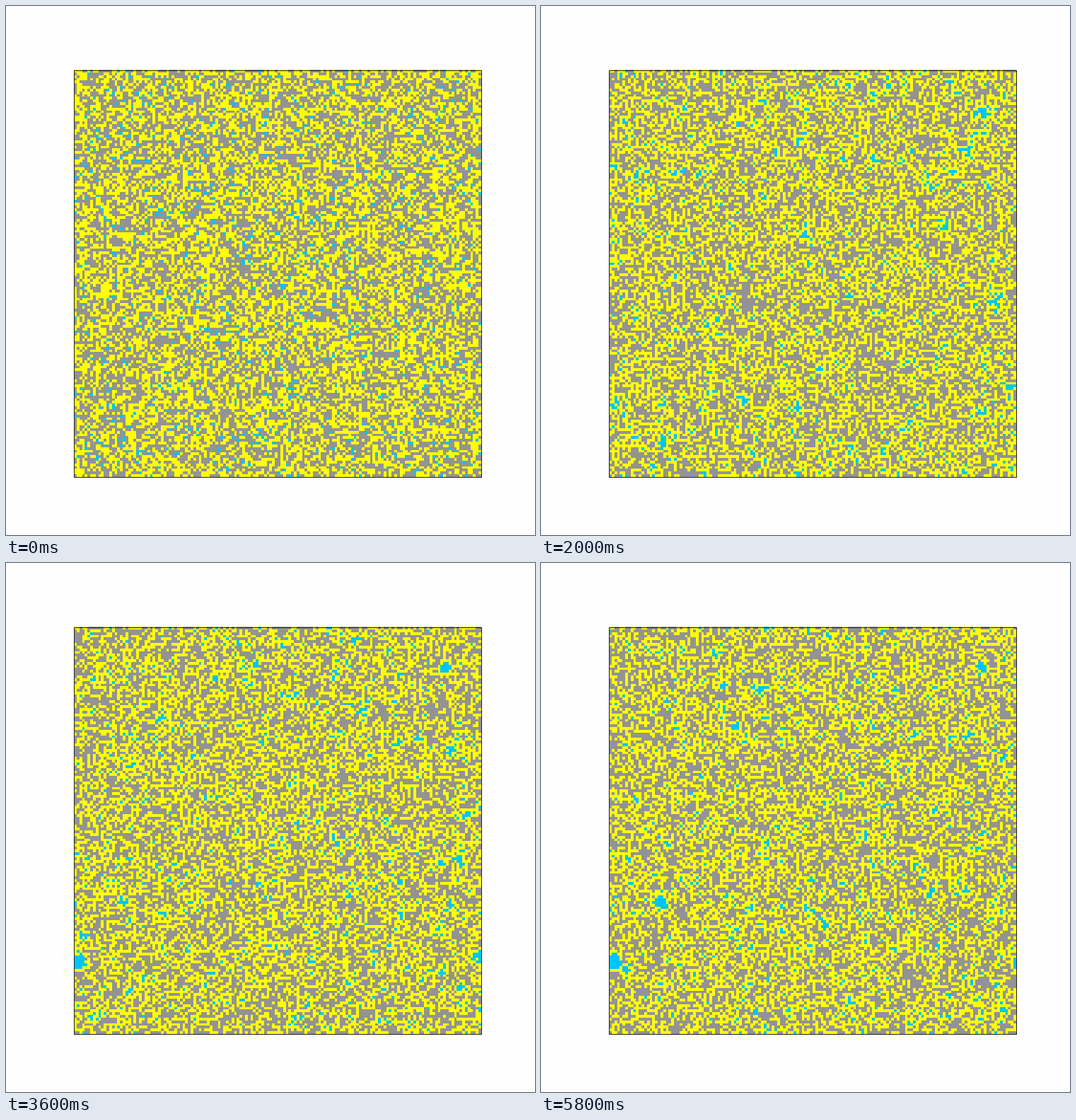
Recreate the animation shown at these times as a matplotlib script. Size 748 by 748 pixels, loop 6 s.

```python
from itertools import product

import matplotlib.pyplot as plt
import numpy as np
from matplotlib.animation import FuncAnimation
from matplotlib.colors import ListedColormap
from matplotlib.patches import Rectangle

SIZE = 748
N = 150
STEPS = 28
SWEEPS = 12
GRAY, YELLOW, CYAN = range(3)
COLORS = ["#939393", "#ffff00", "#00c4ff"]
SHARES = [0.495, 0.47, 0.035]

# Lasting droplets: centre x, y, final radius, first step
DROPS = [(137.4, 15, 1.9, 2), (2, 123, 2.9, 6),
         (18.6, 101.2, 2.1, 14), (118.8, 97.4, 1.5, 20)]


def pull(step):
    """Cells that attract cyan, in discs that grow with time."""
    y, x = np.mgrid[:N, :N] + 0.5
    mask = np.zeros((N, N), bool)
    for cx, cy, radius, first in DROPS:
        if step >= first:
            r = radius * (0.7 + 0.3 * (step - first) / (STEPS - first))
            mask |= np.hypot(x - cx, y - cy) <= r
    return mask


def energies(grid, mask, row, col):
    """Energy of each colour on every second cell from (row, col)."""
    padded = np.pad(grid, 1, mode="wrap")
    near = {}
    for dy, dx in product((-1, 0, 1), repeat=2):
        top, left = 1 + row + dy, 1 + col + dx
        near[dy, dx] = padded[top:top + N - 1:2, left:left + N - 1:2]

    sides = [near[d] for d in ((-1, 0), (1, 0), (0, -1), (0, 1))]
    gray, yellow, cyan = (sum((s == k).astype(int) for s in sides)
                          for k in range(3))
    is_y = {d: cells == YELLOW for d, cells in near.items()}
    # Full 2x2 yellow blocks are costly, so yellow forms thin chains
    blocks = sum((is_y[a, 0] & is_y[0, b] & is_y[a, b]).astype(int)
                 for a, b in product((-1, 1), repeat=2))
    return np.stack([
        2.5 * cyan,
        2.0 * blocks - 0.45 * yellow,
        2.5 * gray - 0.4 * cyan - 8 * mask[row::2, col::2],
    ]).reshape(3, -1)


def exchange(grid, mask, row, col, rng):
    """Metropolis swaps between random pairs of non-adjacent cells."""
    energy = energies(grid, mask, row, col)
    cells = grid[row::2, col::2].ravel()
    order = rng.permutation(cells.size)
    half = cells.size // 2
    a, b = order[:half], order[half:2 * half]
    ca, cb = cells[a], cells[b]
    cost = energy[cb, a] - energy[ca, a] + energy[ca, b] - energy[cb, b]
    ok = rng.random(half) < np.exp(-np.maximum(cost, 0))
    cells[a[ok]], cells[b[ok]] = cb[ok], ca[ok]
    grid[row::2, col::2] = cells.reshape(N // 2, N // 2)


def simulate():
    rng = np.random.default_rng(7)
    grid = rng.choice(3, size=(N, N), p=SHARES)
    states = [grid.copy()]
    for step in range(1, STEPS + 1):
        mask = pull(step)
        for _ in range(SWEEPS):
            for row, col in product((0, 1), repeat=2):
                exchange(grid, mask, row, col, rng)
        states.append(grid.copy())
    return states


states = simulate()

fig = plt.figure(figsize=(SIZE / 100, SIZE / 100), dpi=100, facecolor="#fefefe")
ax = fig.add_axes([0, 0, 1, 1])
image = ax.imshow(states[0], cmap=ListedColormap(COLORS), vmin=0, vmax=2,
                  interpolation="nearest", aspect="auto",
                  extent=(96, 672, 666, 90))
ax.add_patch(Rectangle((96.5, 90.5), 576, 575, fill=False, ec="#202020",
                       lw=0.72, antialiased=False))
ax.set_xlim(0, SIZE)
ax.set_ylim(SIZE, 0)
ax.axis("off")


def update(i):
    # The opening state is held for two ticks
    image.set_data(states[max(i - 1, 0)])
    return [image]


anim = FuncAnimation(fig, update, frames=STEPS + 2, interval=200,
                     repeat=True, repeat_delay=0, blit=False)
plt.show()
```
